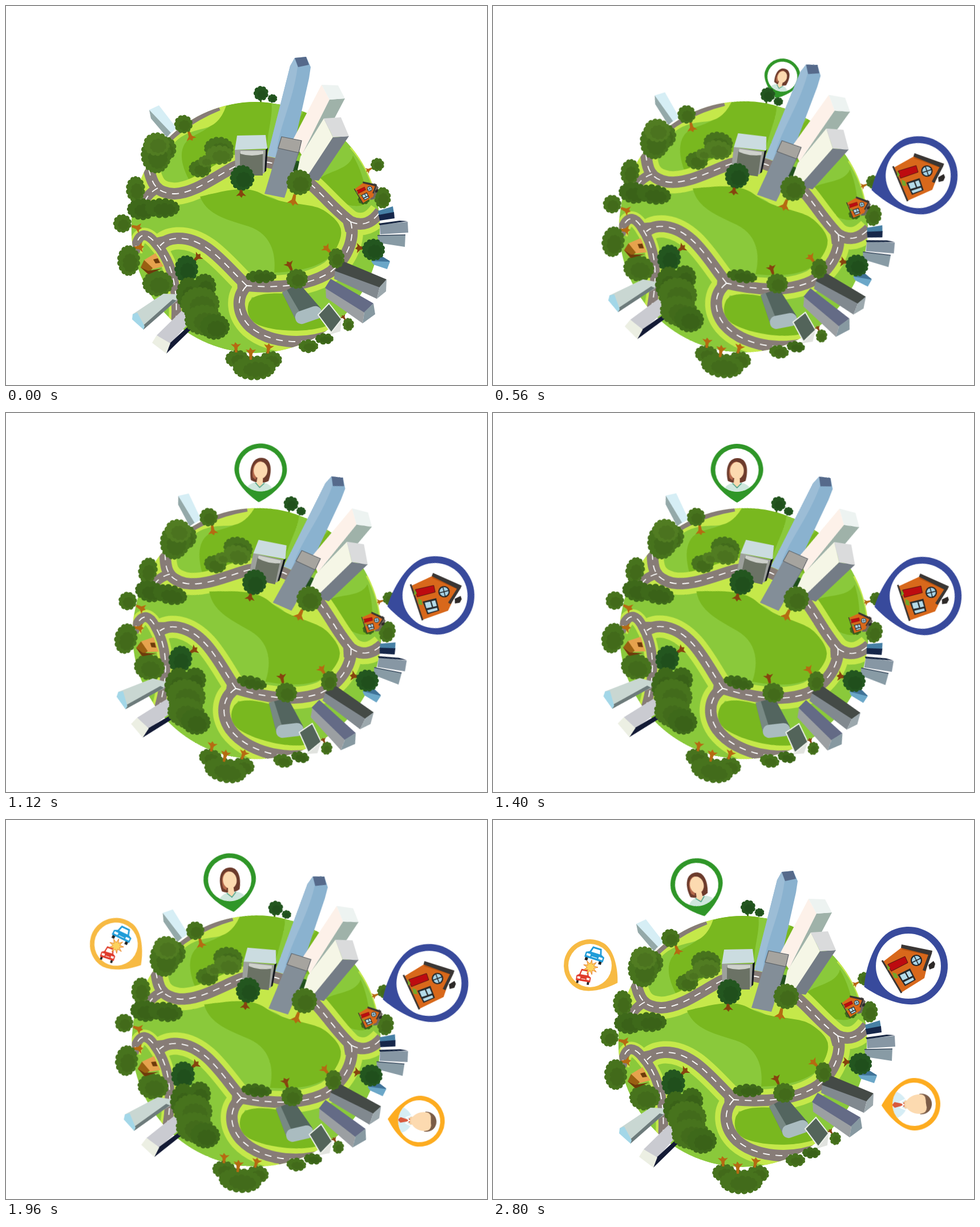
An HTML page that plays this animation: 843x664 px, repeating every 4800 ms.

```html
<!DOCTYPE html>
<html lang="en">
<head>
<meta charset="utf-8">
<title>Little planet</title>
<style>
html, body { margin: 0; width: 100%; height: 100%; overflow: hidden; background: #fff; }
svg { display: block; width: 100vw; height: 100vh; }

.spin, .pop, .slide { animation: 4800ms infinite steps(4); }
.spin, .slide { transform-origin: 446px 398px; }
.spin { animation-name: spin; }
@keyframes spin {
  0% { transform: rotate(0deg); }
  5.8333% { transform: rotate(4.3deg); }
  11.6667% { transform: rotate(8.1deg); }
  17.5% { transform: rotate(11.1deg); }
  23.3333% { transform: rotate(12.4deg); }
  29.1667% { transform: rotate(12.6deg); }
  35% { transform: rotate(11.6deg); }
  40.8333% { transform: rotate(6deg); }
  46.6667% { transform: rotate(1.5deg); }
  52.5% { transform: rotate(.2deg); }
  58.3333%, 100% { transform: rotate(0deg); }
}

.home { transform-origin: 652px 292px; animation-name: popHome; }
@keyframes popHome {
  0% { transform: scale(0); }
  5.8333% { transform: scale(.7); }
  11.6667%, 100% { transform: scale(1); }
}
.woman { transform-origin: 371px 168px; animation-name: popWoman; animation-timing-function: steps(2); }
@keyframes popWoman {
  0%, 8.75% { transform: scale(0); }
  11.6667% { transform: scale(.69); }
  14.5833% { transform: scale(1.17); }
  17.5%, 100% { transform: scale(1); }
}
.crash { transform-origin: 219px 286px; animation-name: popCrash; animation-timing-function: steps(2); }
@keyframes popCrash {
  0%, 29.1667% { transform: scale(0); }
  32.0833% { transform: scale(.69); }
  35% { transform: scale(1.2); }
  37.9167%, 100% { transform: scale(1); }
}
.man { transform-origin: 680px 496px; animation-name: popMan; animation-timing-function: steps(2); }
@keyframes popMan {
  0%, 35% { transform: scale(0); }
  37.9167% { transform: scale(.6); }
  40.8333% { transform: scale(.97); }
  43.75% { transform: scale(1.1); }
  46.6667%, 100% { transform: scale(1); }
}
.slide.far { animation-name: slideFar; }
@keyframes slideFar {
  0%, 17.5% { transform: rotate(22deg); }
  23.3333% { transform: rotate(5deg); }
  29.1667% { transform: rotate(1.2deg); }
  46.6667% { transform: rotate(.7deg); }
  58.3333%, 100% { transform: rotate(0deg); }
}
.slide.near { animation-name: slideNear; }
@keyframes slideNear {
  0%, 46.6667% { transform: rotate(2.1deg); }
  52.5% { transform: rotate(.8deg); }
  58.3333%, 100% { transform: rotate(0deg); }
}

.verge { stroke: #c5e84a; stroke-width: 39; }
.road { stroke: #877c77; stroke-width: 20; }
.dash { stroke: #fff; stroke-width: 1.8; stroke-dasharray: 12 10; }
.verge, .road, .dash { fill: none; }
.m { fill: #47731d; }
.n { fill: #3e691a; }
.l { fill: #517c22; }
.d { fill: #23561f; }
.bark { fill: #b56a12; }
.dark { fill: #86430f; }
</style>
</head>
<body>
<svg viewBox="0 0 843 664" preserveAspectRatio="none">
<defs>
  <clipPath id="disc"><ellipse cx="437.5" cy="388" rx="218" ry="220"/></clipPath>
  <clipPath id="hole"><circle r="38"/></clipPath>
  <g id="roads">
    <path d="M250 285C256 310 262 328 295 329C330 328 365 300 400 282C430 268 465 270 490 285C540 305 560 345 604 378"/>
    <path d="M604 378C612 405 600 440 570 465C530 492 470 494 422 490"/>
    <path d="M422 490C385 455 350 405 300 407C285 408 278 412 270 420"/>
    <path d="M422 490C402 510 405 540 428 562C460 590 520 597 575 575"/>
    <path d="M604 378C625 387 642 380 656 360"/>
  </g>
  <g id="lanes">
    <path d="M226 432C230 395 245 396 260 413C285 440 302 480 298 552"/>
    <path d="M243 343Q249 328 266 319"/>
  </g>
  <path id="trunk" d="M-2-9H2L3 0 9 6 3 5 1 9-3 5-9 6-3 0Z"/>
  <path id="drop" d="M-46 0A46 46 0 1 1 46 0C46 23 18 47 0 57C-18 47-46 23-46 0Z"/>
  <g id="house">
    <path fill="#d8681b" d="M-44-11L-10-37 38-26 28 18-12 43Z"/>
    <path fill="#b9530f" d="M-10-37L38-26 37-22-12-32Z"/>
    <path fill="#3a3634" d="M-12-41L42-30 41-25 30 6 25 4 35-23-13-35Z"/>
    <path fill="#2d2928" d="M35-5L44-12 47-7 45 0 37 3Z"/>
    <path d="M-46-13L-12 44" fill="none" stroke="#3a3634" stroke-width="3"/>
    <path fill="#bd0b10" stroke="#4a1512" d="M-36-6L-6-20 -1-9-30 6Z"/>
    <path fill="#27292b" d="M-19 12L3 1 13 21-6 32Z"/>
    <path fill="#b4dbe9" d="M-15 13L-6 9-1 18-10 22ZM-4 8L2 5 7 14 1 17ZM-8 25L8 17 10 21-5 29Z"/>
    <circle cx="14" cy="-13" r="9" fill="#a9d4e7" stroke="#20262a" stroke-width="2.2"/>
    <path d="M6-9L22-17M10-21L18-5" stroke="#20262a" stroke-width="1.6"/>
    <path fill="#74a72a" d="M-38-7l6 7-4 5ZM-28 8l7 2 3 8-7 0Z"/>
  </g>
  <g id="car">
    <path d="M-15 7h5v7h-5ZM10 7h5v7h-5Z" fill="#222"/>
    <path d="M-11-3L-8-13H8L11-3L17 0V9H-17V0Z" fill="currentColor"/>
    <path d="M-8-3L-6-10H6L8-3Z" fill="#fff"/>
    <path d="M-14 2h6v3h-6ZM8 2h6v3H8ZM-5 5H5" fill="#fff" stroke="#fff"/>
  </g>
</defs>

<g class="spin"><g class="slide far"><g class="pop woman">
  <g transform="translate(357 113) rotate(-14)">
    <use href="#drop" fill="#2f9628"/>
    <circle r="38" fill="#fff"/>
    <g clip-path="url(#hole)">
      <path fill="#6c3b2c" d="M-16 19C-21-2-15-21 1-21C17-21 21-2 15 19Q0 27-16 19Z"/>
      <path fill="#b5694b" d="M-13 14C-17-6-8-16 1-15L-8 18Z"/>
      <path fill="#cfe7de" d="M-24 40C-22 26-13 24-6 22H7C14 24 23 26 25 40Z"/>
      <path fill="#fbd8ad" d="M-5 15H5V24L0 31-6 24Z"/>
      <ellipse cy="1" rx="12" ry="15" fill="#fcdab0"/>
      <path d="M-8 23L0 31 8 23" fill="none" stroke="#4ba184" stroke-width="1.6"/>
    </g>
  </g>
</g></g></g>

<g class="spin">
  <path class="m" d="M445 160h3v10h-3Z"/>
  <ellipse class="leaf d" cx="447" cy="153" rx="13" ry="13"/>
  <ellipse class="leaf d" cx="467" cy="162" rx="9" ry="8"/>
  <path fill="#d6eef5" d="M251 182L268 174 299 214 288 224Z"/>
  <path fill="#94a9a9" d="M251 182L254 197 282 230 289 222Z"/>

  <g clip-path="url(#disc)">
    <ellipse cx="437.5" cy="388" rx="218" ry="220" fill="#8ac93b"/>
    <path fill="#79b81f" d="M384 176C410 166 440 166 465 170C469 195 455 225 457 268L325 312C300 270 303 240 330 227C360 212 373 202 384 176Z"/>
    <path fill="#79b81f" d="M525 180L565 205 530 260 470 265Z"/>
    <path fill="#c5e84a" d="M282 248C310 205 345 185 386 174C377 202 362 211 345 215C315 222 302 230 288 248Z"/>
    <path d="M258 268Q298 210 374 179" fill="none" stroke="#877c77" stroke-width="8"/>
    <path fill="#79b81f" d="M608 262C602 290 552 290 546 308L590 345C615 355 630 350 634 340C628 305 620 282 608 262Z"/>
    <path d="M606 246Q638 282 648 325" fill="none" stroke="#c5e84a" stroke-width="9"/>
    <path d="M614 249Q641 280 651 325" fill="none" stroke="#877c77" stroke-width="4"/>
    <path fill="#c5e84a" d="M345 332C375 305 430 300 455 290L545 300 590 370C560 350 520 352 480 342C440 320 385 324 345 332Z"/>
    <use href="#roads" class="verge"/>
    <use href="#lanes" class="verge" style="stroke-width:26"/>
    <path fill="#79b81f" d="M340 334C380 325 420 312 450 330C490 352 535 342 560 360C592 382 592 397 580 422C568 450 530 465 470 467C474 430 462 398 425 386C385 374 352 365 340 334Z"/>
    <path fill="#79b81f" d="M425 522C432 498 480 504 520 505L578 553C545 574 475 572 443 559C426 551 421 537 425 522Z"/>
    <use href="#roads" class="road"/>
    <use href="#lanes" class="road" style="stroke-width:17"/>
    <path fill="#877c77" d="M258 307L280 323 258 332ZM587 367L612 370 622 384 608 396 595 396ZM405 478L425 480 440 491 420 502 406 504ZM258 407L290 400 275 432Z"/>
    <use href="#roads" class="dash"/>
    <use href="#lanes" class="dash"/>
  </g>

  <ellipse class="leaf d" cx="508" cy="281" rx="10" ry="11"/>
  <path fill="#8ab2cf" d="M506 91L526 89 534 107 531 127 500 265 458 263 498 105Z"/>
  <path fill="#9cbdd6" d="M506 91L498 105 458 263 473 266C476 215 503 170 511 107Z"/>
  <path fill="#566a8b" d="M506 91L526 89 531 103 512 107Z"/>
  <path fill="#fdf1e9" d="M553 138L567 164 519 262 502 236Z"/>
  <path fill="#9fb2a9" d="M567 164L594 162 545 255 515 268Z"/>
  <path fill="#edf3f1" d="M553 138L582 139 594 162 567 164Z"/>
  <path fill="#f5f6e6" d="M557 197L573 230 528 304 511 287 516 264Z"/>
  <path fill="#747c86" d="M573 230L601 228 548 306 525 303Z"/>
  <path fill="#dadbdc" d="M557 197L587 195 601 228 573 230Z"/>
  <path fill="#838e98" d="M477 249L513 257 488 336 453 329Z"/>
  <path fill="#6d7781" d="M518 236L513 257 488 336 491 327Z"/>
  <path fill="#a6a49f" stroke="#5d6267" stroke-width="1.2" d="M483 229L518 236 513 257 477 249Z"/>
  <path fill="#11151c" d="M455 252L459 248 456 289 452 292Z"/>
  <path fill="#9da09c" d="M401 252H455L453 293 402 297Z"/>
  <path fill="#6b7265" d="M410 258H450V297H410Z"/>
  <path fill="#ced1cb" d="M411 254H451V259Q431 265 411 259Z"/>
  <path fill="#cbdce0" d="M405 227L455 226 458 250 401 252Z"/>

  <use href="#trunk" class="bark" transform="translate(323 228) rotate(-20)"/>
  <ellipse class="leaf m" cx="311" cy="207" rx="16" ry="16"/>
  <ellipse class="leaf m" cx="281" cy="250" rx="17" ry="21"/>
  <ellipse class="leaf m" cx="263" cy="260" rx="26" ry="33"/>
  <ellipse class="leaf l" cx="264" cy="242" rx="23" ry="20"/>
  <ellipse class="leaf m" cx="373" cy="249" rx="26" ry="19"/>
  <ellipse class="leaf l" cx="374" cy="261" rx="25" ry="16"/>
  <ellipse class="leaf m" cx="340" cy="285" rx="20" ry="15"/>
  <ellipse class="leaf l" cx="350" cy="272" rx="14" ry="10"/>
  <use href="#trunk" class="dark" transform="translate(412 327)"/>
  <ellipse class="leaf d" cx="414" cy="301" rx="21" ry="22"/>
  <use href="#trunk" class="bark" transform="translate(504 340) rotate(12) scale(1.15)"/>
  <ellipse class="leaf m" cx="514" cy="309" rx="22" ry="22"/>

  <ellipse class="leaf m" cx="227" cy="321" rx="16" ry="23"/>
  <ellipse class="leaf n" cx="238" cy="356" rx="26" ry="18"/>
  <ellipse class="leaf n" cx="274" cy="354" rx="31" ry="16"/>
  <use href="#trunk" class="bark" transform="translate(229 388) rotate(-75)"/>
  <ellipse class="leaf m" cx="204" cy="381" rx="16" ry="16"/>
  <use href="#trunk" class="bark" transform="translate(233 423) rotate(-95)"/>
  <ellipse class="leaf m" cx="215" cy="446" rx="19" ry="27"/>
  <ellipse class="leaf m" cx="266" cy="486" rx="27" ry="22"/>
  <path fill="#e6a24d" d="M242 445L262 433 276 456 257 461Z"/>
  <path fill="#9a6012" d="M242 445L257 459 249 470 236 458Z"/>
  <path fill="#6d3b0b" d="M236 458L249 464 273 460 250 470ZM258 444l8-2 4 8-8 1Z"/>

  <path fill="#c9d7d2" d="M222 540L276 504 301 505 299 517 240 562Z"/>
  <path fill="#6d7b7b" d="M299 516L241 567 239 561 292 514Z"/>
  <path fill="#a3d7e8" d="M222 540L230 537 243 561 241 567 221 549Z"/>
  <path fill="#cacbd1" d="M264 577L312 530 327 548 287 593Z"/>
  <path fill="#131a35" d="M287 591L326 555 326 565 281 609Z"/>
  <path fill="#ecefe3" d="M264 577L288 591 281 609 256 590Z"/>
  <use href="#trunk" class="dark" transform="translate(335 441) rotate(-135)"/>
  <ellipse class="leaf d" cx="316" cy="461" rx="20" ry="24"/>
  <ellipse class="leaf n" cx="320" cy="505" rx="21" ry="30"/>
  <ellipse class="leaf n" cx="348" cy="492" rx="20" ry="23"/>
  <ellipse class="leaf m" cx="340" cy="522" rx="34" ry="29"/>
  <ellipse class="leaf m" cx="346" cy="550" rx="33" ry="26"/>
  <ellipse class="leaf n" cx="366" cy="562" rx="26" ry="22"/>

  <ellipse class="leaf n" cx="447" cy="474" rx="28" ry="10"/>
  <path fill="#53655f" d="M484 502L514 486 552 530 508 550Z"/>
  <path fill="#788984" d="M484 502L492 497 520 545 508 550Z"/>
  <rect x="-24" y="-11" width="48" height="23" rx="11" fill="#aabcc0" transform="translate(530 541) rotate(-19)"/>
  <use href="#trunk" class="dark" transform="translate(497 455) rotate(155)"/>
  <ellipse class="leaf m" cx="510" cy="478" rx="19" ry="17"/>
  <path fill="#81898f" d="M577 463L655 492 650 513 575 478Z"/>
  <path fill="#444a46" d="M588 446L667 479 655 493 576 464Z"/>
  <path fill="#9ca8ad" d="M655 492L667 479 666 500 650 513Z"/>
  <path fill="#9b9fa2" d="M560 492L628 536 625 556 561 511Z"/>
  <path fill="#646b86" d="M569 478L644 521 628 537 559 494Z"/>
  <path fill="#8799a1" d="M628 536L644 521 647 540 625 556Z"/>
  <path fill="#e1e3df" d="M569 572L588 550 586 570 566 576Z"/>
  <path fill="#53645a" stroke="#edf1ea" stroke-width="2" d="M566 521L588 549 570 572 547 541Z"/>
  <use href="#trunk" class="bark" transform="translate(563 426) rotate(135)"/>
  <ellipse class="leaf m" cx="579" cy="442" rx="14" ry="18"/>

  <use href="#trunk" class="bark" transform="translate(636 287) rotate(60) scale(.65)"/>
  <ellipse class="leaf m" cx="651" cy="278" rx="12" ry="12"/>
  <ellipse class="leaf m" cx="660" cy="336" rx="14" ry="19"/>
  <ellipse class="leaf n" cx="627" cy="339" rx="11" ry="9"/>
  <path fill="#6d675f" d="M646 310L653 318 646 338 638 340Z"/>
  <use href="#house" transform="translate(631 326) scale(.45)"/>
  <path fill="#4780a5" d="M652 359L678 351 680 363 654 370Z"/>
  <path fill="#16274a" d="M653 366L680 361 681 372 655 376Z"/>
  <path fill="#8797a4" d="M655 383L704 378 705 397 656 400Z"/>
  <path fill="#182743" d="M653 381L690 376 704 377 655 384Z"/>
  <path fill="#889ba5" d="M651 402L700 401 699 422 653 415Z"/>
  <path d="M651 402L700 401" stroke="#34465a" stroke-width="1.5"/>
  <path fill="#3f7297" d="M640 447L655 436 673 447 668 452Z"/>
  <path fill="#6ba7c8" d="M640 447L673 448 668 461 644 453Z"/>
  <use href="#trunk" class="dark" transform="translate(621 424) rotate(90)"/>
  <ellipse class="leaf d" cx="644" cy="427" rx="20" ry="19"/>
  <use href="#trunk" class="dark" transform="translate(592 546) rotate(145) scale(.6)"/>
  <ellipse class="leaf m" cx="600" cy="558" rx="10" ry="12"/>
  <ellipse class="leaf m" cx="530" cy="596" rx="18" ry="11"/>
  <ellipse class="leaf n" cx="558" cy="583" rx="17" ry="9"/>
  <ellipse class="leaf m" cx="405" cy="618" rx="21" ry="15"/>
  <ellipse class="leaf m" cx="464" cy="620" rx="20" ry="15"/>
  <ellipse class="leaf m" cx="435" cy="634" rx="38" ry="20"/>
  <use href="#trunk" class="bark" transform="translate(403 598) rotate(178)"/>
  <use href="#trunk" class="bark" transform="translate(429 609) rotate(180) scale(1 1.2)"/>
  <use href="#trunk" class="bark" transform="translate(460 600) rotate(190)"/>
</g>

<g class="spin">
  <g class="pop home">
    <use href="#drop" fill="#384a9c" transform="translate(728 256) rotate(65) scale(1.5)"/>
    <circle cx="728" cy="256" r="57" fill="#fff"/>
    <use href="#house" transform="translate(728 259)"/>
  </g>
  <g class="slide near"><g class="pop crash">
    <use href="#drop" fill="#f7ba43" transform="translate(170 255) rotate(-58)"/>
    <circle cx="170" cy="255" r="38" fill="#fff"/>
    <use href="#car" color="#209cd8" transform="translate(179 236) rotate(18)"/>
    <use href="#car" color="#e03a2b" transform="translate(159 274) rotate(10) scale(.75 .95)"/>
    <path id="burst" fill="#fcd25c" stroke="#e8812b" stroke-width="1"/>
  </g></g>
  <g class="pop man">
    <g transform="translate(738 498) rotate(88)">
      <use href="#drop" fill="#fdac20"/>
      <circle r="38" fill="#fff"/>
      <g clip-path="url(#hole)">
        <path fill="#d6edf5" d="M-25 40C-24 24-14 18-8 14H8C15 18 24 24 25 40Z"/>
        <path fill="#f6cfa2" d="M-7 10H7V16L0 21-7 16Z"/>
        <path fill="#7b5c47" d="M-18-10C-20-38 20-38 18-10Z"/>
        <path fill="#fcdab0" d="M-17-12C-15-24-5-19 6-22Q16-22 17-11C18 5 7 15 0 15S-18 5-17-12Z"/>
        <path fill="#d8583d" d="M-4 17H4L2 22 5 34 0 39-5 34-2 22Z"/>
        <path d="M-9 15L-5 24 0 18 5 24 9 15" fill="none" stroke="#fff" stroke-width="2"/>
      </g>
    </g>
  </g>
</g>
</svg>
<script>
const ring = (n, at) => Array.from({ length: n }, (_, i) => at(i * 2 * Math.PI / n, i));
const fix = v => v.toFixed(1);

// Closed outline of round bumps set along an ellipse
function cloud(cx, cy, rx, ry) {
  const n = Math.max(9, Math.round((rx + ry) * Math.PI / 9));
  const pts = ring(n, a => [cx + (rx - 1.5) * Math.cos(a), cy + (ry - 1.5) * Math.sin(a)]);
  return 'M' + pts[0].map(fix) + pts.map((p, i) => {
    const q = pts[(i + 1) % n];
    const r = fix(Math.hypot(q[0] - p[0], q[1] - p[1]) * .56);
    return `A${r} ${r} 0 0 1 ${q.map(fix)}`;
  }).join('') + 'Z';
}

for (const el of document.querySelectorAll('.leaf')) {
  const [cx, cy, rx, ry] = ['cx', 'cy', 'rx', 'ry'].map(k => +el.getAttribute(k));
  const add = d => {
    const path = document.createElementNS(el.namespaceURI, 'path');
    path.setAttribute('d', d);
    el.before(path);
    return path;
  };
  add(cloud(cx, cy, rx, ry)).setAttribute('class', el.getAttribute('class').replace('leaf ', ''));
  add(cloud(cx + rx * .12, cy + ry * .15, rx * .65, ry * .62)).setAttribute('fill-opacity', '.07');
  el.remove();
}

document.getElementById('burst').setAttribute('d', 'M' + ring(18, (a, i) => {
  const r = i % 2 ? 6 : 13;
  return [171 + r * Math.cos(a), 258 + r * Math.sin(a)].map(fix);
}).join('L') + 'Z');
</script>
</body>
</html>
```
